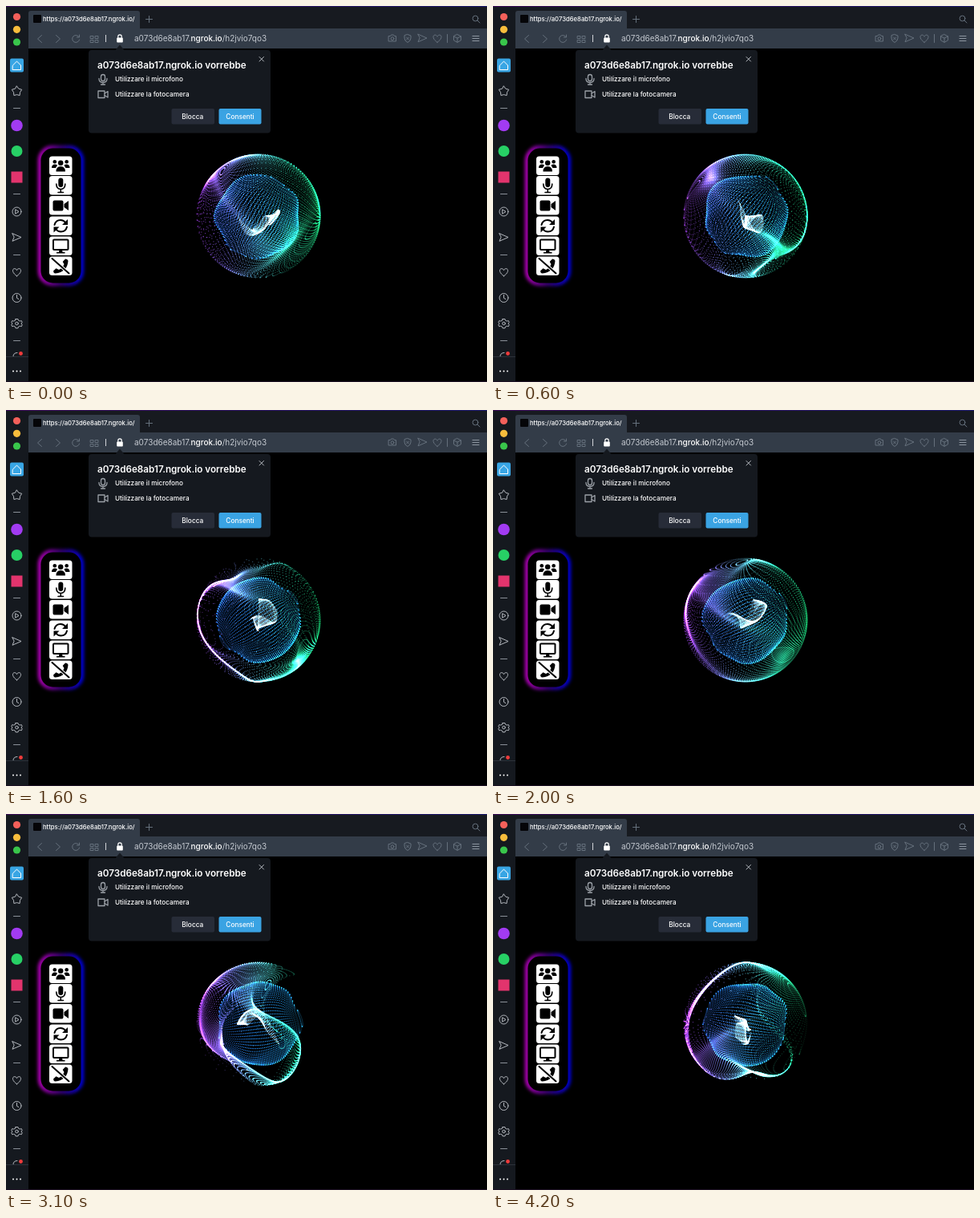
Animation, 600 px wide and 469 px high, one loop 4.3 s. Source, as an HTML page with a canvas:

```html
<!DOCTYPE html>
<html lang="it">
<head>
<meta charset="utf-8">
<title>Particle orb</title>
<style>
  html, body { margin: 0; width: 100%; height: 100%; overflow: hidden; background: #000; }
  svg, canvas { position: absolute; display: block; }
  svg { left: 0; top: 0; }
  canvas { left: 230px; top: 177px; }
  text { font-family: Inter, "Open Sans", sans-serif; fill: #fff; }
  .line { fill: none; stroke: #b4b8be; stroke-width: 1; stroke-linecap: round; stroke-linejoin: round; }
  .dim { stroke: #65707c; }
  .ink { fill: none; stroke: #000; stroke-width: 2; stroke-linecap: round; stroke-linejoin: round; }
</style>
</head>
<body>
<svg width="600" height="469" viewBox="0 0 600 469">
  <defs>
    <linearGradient id="neon">
      <stop offset="0" stop-color="#c400cc"/>
      <stop offset=".5" stop-color="#3c0080"/>
      <stop offset="1" stop-color="#0000f0"/>
    </linearGradient>
    <linearGradient id="edge">
      <stop offset="0" stop-color="#3c0c58"/>
      <stop offset="1" stop-color="#1c1a70"/>
    </linearGradient>
    <filter id="glow" x="-30%" y="-10%" width="160%" height="120%">
      <feGaussianBlur stdDeviation="1.9"/>
    </filter>
    <path id="heart" d="M0 4.8C-7 0-5.5-4.4-2.8-4.4-1.2-4.4 0-3 0-2.2 0-3 1.2-4.4 2.8-4.4 5.5-4.4 7 0 0 4.8Z"/>
    <path id="send" d="M-5-4.8 6 0-5 4.8-3 0Z"/>
    <rect id="key" x="54" width="28.5" height="23.5" rx="3.5" fill="#fff"/>
  </defs>

  <!-- window -->
  <path d="M0 0H600V28H0Z" fill="#171a20"/>
  <path d="M0 0H28V469H0Z" fill="#15191f"/>
  <path d="M28 28H600V53H28Z" fill="#333c48"/>
  <path d="M28 28V9Q28 6 31 6H164Q167 6 167 9V28Z" fill="#333c48"/>
  <path d="M0 0H600V1H0Z" fill="url(#edge)"/>
  <path d="M0 468H600V469H0Z" fill="#1c1024"/>

  <!-- tab strip -->
  <rect x="34" y="11" width="10" height="10" rx="1" fill="#050508"/>
  <text x="46" y="18.8" font-size="7.7" font-weight="500">https://a073d6e8ab17.ngrok.io/</text>
  <g class="line dim">
    <path d="M174.5 16.5h8M178.500 12.5v8"/>
    <circle cx="585.5" cy="15.5" r="3.4"/><path d="M588 18l3 3"/>
  </g>

  <!-- toolbar -->
  <g class="line dim">
    <path d="M44.5 36.5l-5 4.5 5 4.5M62.5 36.5l5 4.500-5 4.5"/>
    <path d="M91 38.500a4.500 4.500 0 1 0 .6 3.5M91.500 36v3h-3"/>
    <path d="M105.5 37.500h3.500v3h-3.500zM111.500 37.500h3.500v3h-3.500zM105.500 42.500h3.500v3h-3.500zM111.500 42.500h3.500v3h-3.500z"/>
    <path d="M477.5 37.500h2l1-1.500h3l1 1.500h2v6.500h-9z"/><circle cx="482" cy="40.7" r="1.900"/>
    <path d="M501 35.5l4 1.500v3q0 3.500-4 5.500-4-2-4-5.500v-3zM499.500 39l3 3m0-3l-3 3"/>
    <use href="#send" x="519" y="40"/><use href="#heart" x="538" y="40.5"/>
    <path d="M550.5 35.500v10M563 35.500l4.500 2.300v5l-4.500 2.500-4.500-2.500v-5zM558.500 37.800l4.500 2.300 4.500-2.300M563 40.100v5.200"/>
    <path d="M582 37.500h8M582 40.500h8M582 43.500h8" stroke="#8d96a0"/>
  </g>
  <path d="M124 36h1v9h-1z" fill="#d0d4d8"/>
  <rect x="138.2" y="39.5" width="7.6" height="6" rx="1" fill="#fff"/>
  <path d="M139.8 40v-2a2.200 2.200 0 0 1 4.400 0v2" class="line" style="stroke:#fff;stroke-width:1.2"/>
  <text x="160" y="43.8" font-size="10"><tspan fill="#c3c8cf">a073d6e8ab17.</tspan><tspan font-weight="500">ngrok.io</tspan><tspan fill="#c3c8cf">/h2jvio7qo3</tspan></text>

  <!-- sidebar -->
  <circle cx="13.5" cy="13.5" r="4.6" fill="#f4605a"/>
  <circle cx="13.5" cy="29.3" r="4.6" fill="#f8bd3c"/>
  <circle cx="13.5" cy="45" r="4.6" fill="#39c64b"/>
  <rect x="5" y="65.5" width="17" height="17" rx="2" fill="#38a5e4"/>
  <path d="M8.5 74l5-5 5 5v5.500h-10z" class="line" style="stroke:#fff"/>
  <g class="line">
    <path d="M13.5 100l2.300 3.200 3.900 1.100-2.200 3.400-.4 3.800-3.600-.9-3.600.9-.4-3.800-2.200-3.400 3.900-1.100z"/>
    <path d="M9.5 127.500h8M9.500 234.500h8M9.500 310.500h8M9.500 417.500h8" stroke="#8a9098"/>
    <circle cx="13.5" cy="256.5" r="5.5"/><path d="M12 254l4 2.500-4 2.500z"/>
    <use href="#send" x="13" y="288.5"/><use href="#heart" x="13.5" y="332"/>
    <circle cx="13.5" cy="364" r="5.5"/><path d="M13.500 360.500v3.800l2.300 1.300"/>
    <path d="M12 390.500h3l.5 1.700 2 .9 1.700-.6 1 2-1.200 1.500 1.200 1.800-1 2-1.700-.6-2 .9-.5 1.700h-3l-.5-1.700-2-.9-1.700.6-1-2 1.200-1.800-1.200-1.500 1-2 1.700.6 2-.9z"/>
    <circle cx="13.5" cy="396" r="1.8"/>
    <path d="M9 437q0-4.500 5-4.500"/>
  </g>
  <circle cx="13.5" cy="149" r="7.3" fill="#a23bf2"/>
  <circle cx="13.5" cy="181" r="7" fill="#27d065"/>
  <rect x="6.5" y="206.5" width="14" height="14" fill="#e2346d"/>
  <circle cx="18.5" cy="433.5" r="2.4" fill="#ef3b3b"/>
  <path d="M0 437h28v1H0z" fill="#2c323a"/>
  <path d="M9 455.500h0M13.500 455.500h0M18 455.500h0" class="line" style="stroke:#fff;stroke-width:2"/>

  <!-- permission box -->
  <path d="M136 55.500l6-7 6 7z" fill="#15191f"/>
  <rect x="103" y="55" width="227" height="103.5" rx="4" fill="#15191f"/>
  <path d="M316 63.500l5.500 5.500m0-5.500l-5.500 5.500" class="line"/>
  <text x="114" y="78" font-size="11.7" font-weight="600">a073d6e8ab17.ngrok.io vorrebbe</text>
  <g font-size="8.2" font-weight="500">
    <text x="136" y="94.3">Utilizzare il microfono</text>
    <text x="136" y="113">Utilizzare la fotocamera</text>
  </g>
  <g class="line" style="stroke:#9ba0a7;stroke-width:1.3">
    <rect x="118.5" y="85.5" width="5" height="8" rx="2.5"/>
    <path d="M116 90.500q0 5 5 5t5-5M121 95.500v2.500M118.500 98h5"/>
    <rect x="115" y="106" width="8" height="8.5"/><path d="M123 109l4-2.500v7.500l-4-2.500"/>
  </g>
  <rect x="206.5" y="128" width="53.5" height="19.5" rx="2" fill="#272c38"/>
  <rect x="265.5" y="128" width="53" height="19.5" rx="2" fill="#3aa3e3"/>
  <g font-size="8.3" font-weight="500" text-anchor="middle">
    <text x="232.8" y="140.8">Blocca</text>
    <text x="292" y="140.8">Consenti</text>
  </g>

  <!-- call controls -->
  <rect x="42.5" y="176.500" width="52" height="170" rx="16" fill="none" stroke="url(#neon)" stroke-width="5" filter="url(#glow)"/>
  <rect x="43.5" y="177.500" width="50" height="168" rx="15"/>
  <use href="#key" y="187.5"/><use href="#key" y="212"/><use href="#key" y="237"/>
  <use href="#key" y="262.5"/><use href="#key" y="287.5"/><use href="#key" y="312.5"/>
  <circle cx="60.8" cy="194.3" r="2.3"/><circle cx="75.7" cy="194.3" r="2.3"/>
  <path d="M57 202q0-4.500 4-4.500 2 0 3 1.300l-2 3.200zM79.500 202q0-4.500-4-4.500-2 0-3 1.300l2 3.200z"/>
  <circle cx="68.2" cy="195.8" r="3.2"/>
  <path d="M62.500 206.500q0-6.500 5.700-6.500t5.700 6.500z"/>
  <rect x="65.3" y="214.5" width="6" height="11.5" rx="3"/>
  <path d="M62.800 222q0 6.500 5.500 6.500t5.500-6.500M68.300 228.500v4M65 232.500h6.500" class="ink" style="stroke-width:1.6"/>
  <rect x="58.5" y="242.5" width="13" height="13" rx="2"/><path d="M72.500 247l5.500-4v12l-5.500-4z"/>
  <path d="M60.500 273q1.500-6 7.500-6 4 0 6.500 3.500M76 275.500q-1.500 6-7.500 6-4 0-6.500-3.500" class="ink"/>
  <path d="M77 266v7h-7zM59.500 282.500v-7h7z"/>
  <rect x="59" y="291.5" width="18.5" height="12.5" rx="1" class="ink"/>
  <path d="M66.500 304.500h3.500l.7 2.500h2.800v1.500H63V307h2.800z"/>
  <path d="M74 315.500q3 0 3.500 2.500-1 14-16 15.500-2.500-.5-2.500-3l3.500-3.300 3.500 1.800q5-2.300 6.500-7l-1.800-3z"/>
  <path d="M57.500 315l21 18.500" class="ink" style="stroke:#fff;stroke-width:4"/>
  <path d="M57.500 315l21 18.500" class="ink"/>
</svg>
<canvas id="orb" width="170" height="170"></canvas>

<script>
const LOOP = 4300, STEP = 100, R = 77, CORE = 52;
const { sin, cos, PI, hypot } = Math;
const ctx = document.getElementById('orb').getContext('2d');

const lerp = (a, b, p) => a + (b - a) * p;
const clamp = (v, lo, hi) => Math.min(hi, Math.max(lo, v));

// Colour runs across the orb from left to right.
function ramp(...stops) {
  return Array.from({ length: 33 }, (_, i) => {
    const s = i / 32 * (stops.length - 1), k = Math.min(stops.length - 2, Math.floor(s));
    return `rgb(${stops[k].map((c, j) => Math.round(lerp(c, stops[k + 1][j], s - k)))})`;
  });
}
const shellInk = ramp([165, 60, 240], [130, 120, 250], [90, 205, 230], [40, 205, 160], [20, 180, 100]);
const coreInk = ramp([35, 85, 205], [30, 120, 205], [25, 150, 200]);
const wispInk = ramp([190, 225, 255], [215, 245, 250]);

function dot(x, y, ink, alpha) {
  ctx.globalAlpha = alpha;
  ctx.fillStyle = ink[Math.round(clamp((x / R + 1) * 16, 0, 32))];
  ctx.fillRect(x - .55, y - .55, 1.1, 1.1);
}

// Evenly spread dots on a tilted unit sphere.
function globe(rows, cols, tilt, plot) {
  const c = cos(tilt), s = sin(tilt);
  for (let i = 0; i < rows; i++) {
    const h = (i + .5) / rows * 2 - 1, ring = Math.sqrt(1 - h * h);
    for (let j = 0; j < cols; j++) {
      const lon = j / cols * 2 * PI, x = ring * cos(lon);
      plot(x * c - h * s, x * s + h * c, ring * sin(lon), Math.max(.3, ring));
    }
  }
}

// Sine flow that folds the shell over itself, then lands back on the sphere.
function fold(x, y, z, amp, s) {
  const px = -.65 * (s - 1.2), py = PI / 2 + 2.6 * (s - 1.2), pz = 1.1 * s;
  for (let pass = 0; pass < 2; pass++) {
    const k = 2 + pass * .8, a = amp / (1 + pass);
    const nx = x + a * sin(k * y + px), ny = y + a * sin(k * z + py), nz = z + a * sin(k * x + pz);
    const len = hypot(nx, ny, nz) || 1;
    x = nx / len; y = ny / len; z = nz / len;
  }
  return [x * R, y * R];
}

function drawCore(s) {
  globe(48, 78, .5 + s * .3, (x, y, z, weight) => {
    const r = CORE * (1 + .05 * sin(4 * x + 3 * z + 4 * s) * cos(3 * y - s) + .03 * sin(7 * y + 5 * x - 3 * s));
    dot(x * r, y * r, coreInk, .75 * weight);
  });
}

function drawShell(s) {
  const amp = .7 + .28 * cos(2 * PI * (s - 1.1) / 2.5);
  globe(72, 120, -.6 + s * .4, (x, y, z, weight) => {
    dot(...fold(x, y, z, amp, s), shellInk, .62 * weight);
  });
}

// A small veil twisting in the middle.
function drawWisp(s) {
  for (let i = 0; i < 20; i++) {
    for (let j = 0; j < 44; j++) {
      const v = i / 19, u = j / 43 * 2.4;
      dot(27 * sin(u - 1.2 + .8 * sin(2 * v + 2 * s)) * cos(v + s),
          27 * sin(1.7 * u + 1.3 * v - 1.4 * s) * cos(.9 * v + .5 * u), wispInk, .4);
    }
  }
}

function draw(t) {
  const s = t / 1000;
  ctx.setTransform(1, 0, 0, 1, 0, 0);
  ctx.clearRect(0, 0, 170, 170);
  ctx.globalCompositeOperation = 'lighter';
  ctx.translate(85, 85);
  drawCore(s);
  drawShell(s);
  drawWisp(s);
}

const start = performance.now();
let shown = -1;
function tick() {
  const t = Math.floor((performance.now() - start) % LOOP / STEP) * STEP;
  if (t !== shown) draw(shown = t);
  requestAnimationFrame(tick);
}
tick();
</script>
</body>
</html>
```
